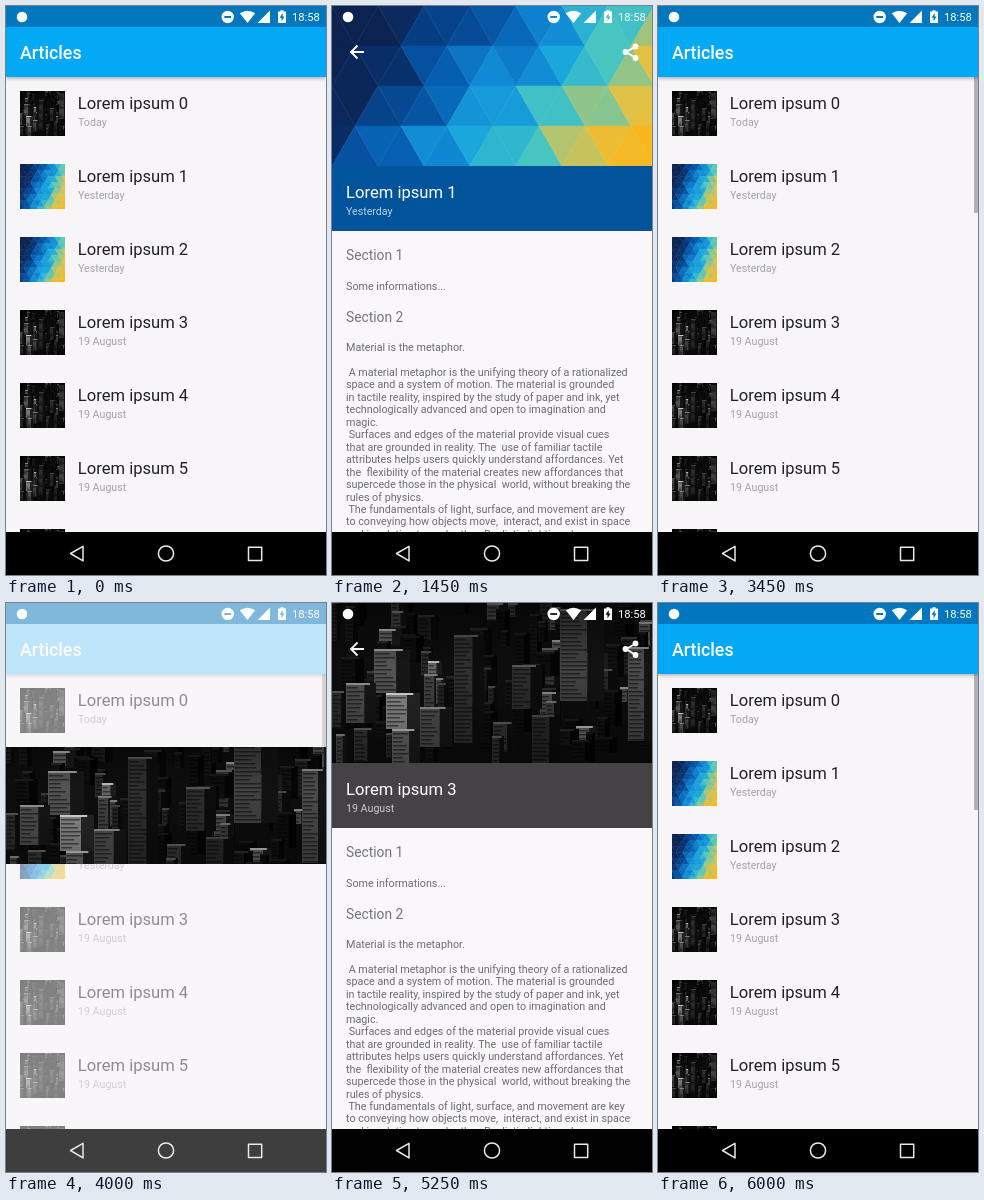
Write an HTML page with a canvas that moves like this. It is 320 px wide and 569 px high and loops after 6050 ms.

```html
<!DOCTYPE html>
<html lang="en">
<head>
<meta charset="utf-8">
<title>Articles</title>
<style>
  html, body { margin: 0; width: 100%; height: 100%; overflow: hidden; }
  #stage { position: relative; width: 320px; height: 569px; overflow: hidden; background: #f7f5f8; }
  #stage > * { position: absolute; left: 0; top: 0; }
  svg { display: block; width: 320px; height: 569px; }
  text { font-family: Roboto, sans-serif; white-space: pre; }
  canvas { position: absolute; }
  .header { width: 320px; height: 71px; background: #03a9f4; box-shadow: 0 1px 4px rgba(0, 0, 0, .35); }
  .status { width: 320px; height: 21px; background: #0277bd; }
  #stage > .nav { top: 526px; width: 320px; height: 43px; background: #000; }
  #stage > .bar { left: 316px; top: 71px; width: 4px; height: 136px; background: #b3b0b4; }
  #stage > .wash { top: 21px; width: 320px; height: 50px; background: #fff; }
  .press { width: 320px; height: 73px; background: rgba(0, 0, 0, .05); }
  .paper { width: 320px; height: 569px; background: #f9f7fa; }
  .hero { width: 320px; overflow: hidden; }
  .hero canvas { left: 0; top: 50%; margin-top: -80px; }
</style>
</head>
<body>
<div id="stage"></div>
<script>
const T = 6050;
const STANDARD = 'cubic-bezier(.4, 0, .2, 1)';
const stage = document.getElementById('stage');

function add(cls, html = '') {
  const el = document.createElement('div');
  el.className = cls;
  el.innerHTML = html;
  return stage.appendChild(el);
}

const layer = body => add('layer', `<svg viewBox="0 0 320 569">${body}</svg>`);

const text = (x, y, size, fill, str, extra = '') =>
  `<text x="${x}" y="${y}" font-size="${size}" fill="${fill}" ${extra}>${str}</text>`;

// Steps are [ms, properties, easing to the next step].
function animate(el, steps) {
  const all = [[0, steps[0][1]], ...steps, [T, steps[steps.length - 1][1]]];
  el.animate(
    all.map(([ms, props, easing = 'linear']) => ({ offset: ms / T, easing, ...props })),
    { duration: T, iterations: Infinity });
}

const fade = (el, ...steps) =>
  animate(el, steps.map(([ms, opacity, easing]) => [ms, { opacity }, easing]));

function random(seed) {
  return () => (seed = (seed * 16807) % 2147483647) / 2147483647;
}

function makeCanvas(w, h, paint) {
  const c = document.createElement('canvas');
  c.width = w;
  c.height = h;
  paint(c.getContext('2d'), w, h);
  return c;
}

const RAMP = [[12, 34, 80], [6, 58, 126], [6, 95, 178], [16, 136, 212],
              [26, 168, 220], [78, 200, 190], [222, 194, 74], [250, 182, 26]];

function rampColor(u) {
  const p = Math.max(0, Math.min(.999, u)) * (RAMP.length - 1);
  const i = Math.floor(p);
  return `rgb(${RAMP[i].map((v, k) => Math.round(v + (RAMP[i + 1][k] - v) * (p - i)))})`;
}

const triangles = side => (g, w, h) => {
  const rnd = random(71), high = side * .87;
  for (let r = 0; r * high < h; r++) {
    for (let i = -1; i * side / 2 < w; i++) {
      const x = i * side / 2, y = r * high, up = (i + r) & 1;
      const u = (x + side / 2) / w * .9 + ((y + high / 2) / h - .5) * .36 + (rnd() - .5) * .16 - .02;
      g.fillStyle = g.strokeStyle = rampColor(u);
      g.lineWidth = .5;
      g.beginPath();
      g.moveTo(x, up ? y + high : y);
      g.lineTo(x + side, up ? y + high : y);
      g.lineTo(x + side / 2, up ? y : y + high);
      g.closePath();
      g.fill();
      g.stroke();
    }
  }
};

const grey = v => `rgb(${v},${v},${v})`;

function city(g, w, h) {
  const rnd = random(2024);
  g.fillStyle = '#0e0e0e';
  g.fillRect(0, 0, w, h);

  function tower(x, y, tw, th, lum) {
    const face = tw * .62;
    g.fillStyle = grey(lum * .8 | 0);
    g.fillRect(x, y, face, th);
    g.fillStyle = grey(lum * .22 | 0);
    g.fillRect(x + face, y, tw - face, th);
    g.fillStyle = grey(Math.min(230, lum * 1.5) | 0);
    g.fillRect(x, y, tw * .8, 2);
    g.fillStyle = grey(lum * .4 | 0);
    for (let wy = y + 4; wy < y + th; wy += 4) g.fillRect(x + 1, wy, face * (.5 + rnd() * .5), 1.5);
  }

  for (let i = 0; i < 110; i++) {
    const lum = 18 + 120 * rnd() ** 3;
    tower(rnd() * 326 - 8 | 0, i * 1.35 - 10 | 0, 9 + rnd() * 15 | 0, 14 + rnd() * 26 | 0, lum);
  }
  [[122, 32, 30, 108, 64], [228, 6, 44, 92, 88], [180, 62, 30, 44, 60], [296, 44, 26, 94, 100],
   [42, 46, 36, 44, 112], [54, 90, 34, 36, 185], [14, 80, 30, 40, 105], [88, 104, 32, 40, 105],
   [60, 126, 28, 34, 140], [200, 112, 28, 48, 55]].forEach(t => tower(...t));
  const shade = g.createLinearGradient(0, 0, 0, h);
  shade.addColorStop(0, 'rgba(0,0,0,.5)');
  shade.addColorStop(.4, 'rgba(0,0,0,.05)');
  shade.addColorStop(1, 'rgba(0,0,0,.4)');
  g.fillStyle = shade;
  g.fillRect(0, 0, w, h);
}

function cityThumb(g, w, h) {
  g.drawImage(makeCanvas(320, 160, city), 20, 0, 240, 160, 0, 0, w, h);
}

// Article list
const dates = ['Today', 'Yesterday', 'Yesterday', ...Array(4).fill('19 August')];
layer(dates.map((date, i) =>
  text(71.8, 103 + i * 73, 16.6, '#212121', 'Lorem ipsum ' + i) +
  text(72, 119.7 + i * 73, 10.67, '#a3a3a3', date)).join(''));
dates.forEach((date, i) => {
  const thumb = makeCanvas(45, 45, date === 'Yesterday' ? triangles(7) : cityThumb);
  thumb.style.left = '14px';
  thumb.style.top = 85 + i * 73 + 'px';
  stage.append(thumb);
});
fade(add('bar'), [2349, 0], [2350, 1]);
add('header');
add('status');
layer(text(14, 53, 17.8, '#fff', 'Articles', 'font-weight="500"'));
add('nav');

// Article pages
const BODY = ` A material metaphor is the unifying theory of a rationalized
space and a system of motion. The material is grounded
in tactile reality, inspired by the study of paper and ink, yet
technologically advanced and open to imagination and
magic.
 Surfaces and edges of the material provide visual cues
that are grounded in reality. The  use of familiar tactile
attributes helps users quickly understand affordances. Yet
the  flexibility of the material creates new affordances that
supercede those in the physical  world, without breaking the
rules of physics.
 The fundamentals of light, surface, and movement are key
to conveying how objects move,  interact, and exist in space
and in relation to each other. Realistic lighting shows`.split('\n');

function page({ index, open, close, color, paint }) {
  const rowTop = 71 + 73 * index + 'px';
  const small = (y, str) => text(14, y, 10.75, '#6c6c6c', str);
  const heading = (y, str) => text(14, y, 13.8, '#757575', str);

  const press = add('press');
  press.style.top = rowTop;
  fade(press, [open - 340, 0], [open - 140, 1], [open, 1], [open + 150, 0]);

  const enter = [[open, 0, STANDARD], [open + 600, 1], [close, 1]];
  fade(add('wash'), ...enter, [close + 1, 0]);
  fade(add('paper'), ...enter, [close + 600, 0]);
  fade(add('nav'), ...enter, [close + 400, 0]);

  const content = layer(
    `<clipPath id="c${index}"><path d="M0 0H320V526H0Z"/></clipPath><g clip-path="url(#c${index})">` +
    `<path d="M0 160H320V225H0Z" fill="${color}"/>` +
    text(14.1, 192, 16.6, '#fff', 'Lorem ipsum ' + index) +
    text(14, 208.5, 10.67, 'rgba(255,255,255,.72)', dates[index]) +
    heading(254, 'Section 1') + small(284, 'Some informations...') +
    heading(315.5, 'Section 2') + small(345, 'Material is the metaphor.') +
    BODY.map((line, i) => small(370 + i * 12.45, line)).join('') + '</g>');
  fade(content, [open + 260, 0], [open + 610, 1], [close, 1], [close + 600, 0]);

  const hero = add('hero');
  hero.append(makeCanvas(320, 160, paint));
  const row = { top: rowTop, height: '73px' }, full = { top: '0px', height: '160px' };
  animate(hero, [[open, row, STANDARD], [open + 600, full], [close + 67, full, STANDARD], [close + 667, row]]);
  fade(hero, [open, 0], [open + 40, 1], [close + 650, 1], [close + 750, 0]);

  const tools = layer(
    `<g fill="none" stroke="#fff" stroke-width="1.8"><path d="M32 46H19.5M25.5 39.5L19 46L25.5 52.5"/>
     <path d="M303 41L294 46L303 51.5"/></g>
     <g fill="#fff"><circle cx="303.5" cy="40.5" r="2.9"/><circle cx="293.5" cy="46" r="2.9"/>
     <circle cx="303.5" cy="52" r="2.9"/></g>`);
  fade(tools, [open + 260, 0], [open + 610, 1], [close, 1], [close + 250, 0]);
}

page({ index: 1, open: 840, close: 2350, color: '#01549c', paint: triangles(46) });
page({ index: 3, open: 3790, close: 5250, color: '#444244', paint: city });

// System bars
fade(add('status'), [2350, 0], [2950, 1], [2951, 0], [5250, 0], [5850, 1], [5851, 0]);
layer(`<g fill="#fff" fill-rule="evenodd">
  <circle cx="16" cy="11" r="5.3"/>
  <path d="M215.5 11a6.2 6.2 0 1 0 12.4 0a6.2 6.2 0 1 0 -12.4 0ZM218.3 10V12H225.1V10Z"/>
  <path d="M233.8 7.2Q241.5 2.2 249.2 7.2L241.5 17Z"/>
  <path d="M264 4.6V17H251.6Z"/>
  <path d="M272 5.5H274.4V4.2H277.6V5.5H280V17H272ZM276.7 7L273.6 11.8H275.5V15.6L278.5 10.6H276.7Z"/>
  </g>` + text(286, 15, 11.2, '#fff', '18:58') +
  `<g fill="none" stroke="#e8e8e8" stroke-width="1.5" stroke-linejoin="round">
  <path d="M64.5 547.5L77 540.3V554.9Z"/><circle cx="160" cy="547.5" r="7.6"/>
  <path d="M242.5 541.2H255.7V554.4H242.5Z"/></g>`);
</script>
</body>
</html>
```
